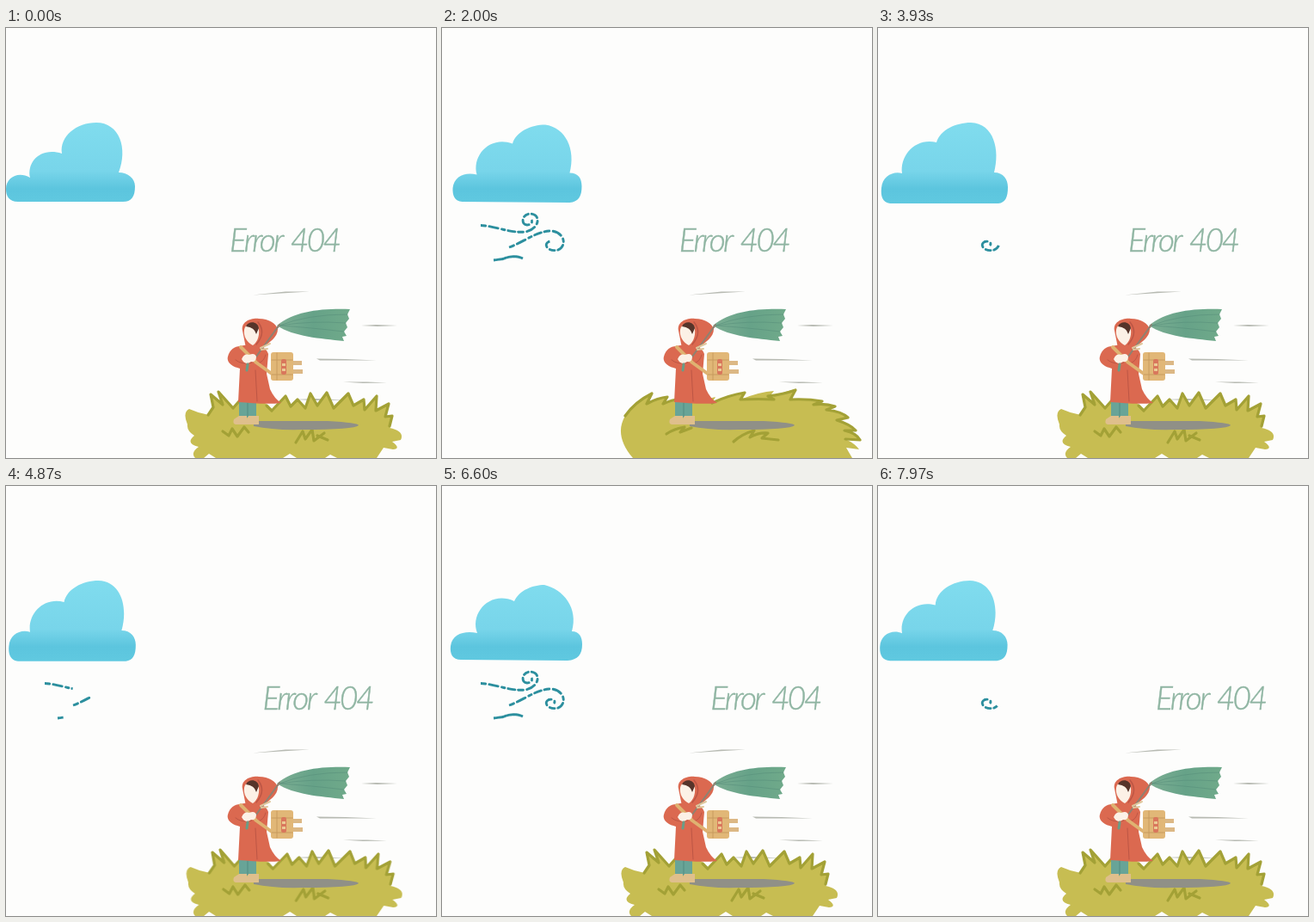
Write an HTML page that moves like this. It is 500x500 px and loops after 8.01 s.

```html
<!DOCTYPE html>
<html lang="en">
<head>
<meta charset="utf-8">
<title>Error 404</title>
<style>
  html, body { margin: 0; width: 100%; height: 100%; overflow: hidden; background: #fdfdfc; }
  svg { display: block; width: 100vw; height: 100vh; }
  .line { fill: none; stroke-linecap: round; stroke-linejoin: round; }

  .title {
    font: italic 300 37px Lato, "Open Sans", sans-serif;
    letter-spacing: -2.6px;
    word-spacing: 4px;
    fill: #8fb5a2;
    stroke: #8fb5a2;
    stroke-width: .5;
    animation: drift 8010ms linear infinite;
  }
  @keyframes drift { to { transform: translateX(63.3px); } }

  .cloud { animation: puff 4005ms linear infinite; }
  @keyframes puff {
    0%, 100% { d: path("M14 202C3 202 0 195 0 187C0 174 14 166 28 174C24 156 40 138 65 146C62 126 82 110 105 110C132 110 142 140 131 168C142 168 150 175 150 184C150 196 146 202 136 202Z"); }
    25.6%, 86.5%, 98.3% { d: path("M14 204C5 203 3 195 4 186C5 172 18 166 28 169C25 148 44 127 68 133C72 119 90 110 108 110C135 111 142 142 135 168C146 168 151 176 151 185C151 197 148 203 140 204Z"); }
    33.2%, 80% { d: path("M22 203C14 202 12 194 12 186C13 172 26 166 36 170C33 149 50 128 77 134C79 120 98 110 118 110C145 111 152 140 145 168C155 168 159 175 159 184C159 196 156 203 148 204Z"); }
    43.1% { d: path("M25 202C17 201 15 194 15 186C16 172 29 166 40 170C37 149 55 129 80 135C82 120 101 110 121 110C146 111 153 140 146 168C158 168 162 175 162 184C162 196 159 202 151 203Z"); }
    57%, 72% { d: path("M22 202C12 202 9 195 10 186C12 172 26 168 41 171C32 148 56 121 84 134C90 121 106 115 119 115C141 120 159 142 151 169C160 169 163 176 163 184C163 196 158 202 146 203Z"); }
  }

  .ink { stroke: #2c8f9e; stroke-width: 2.9; stroke-dasharray: 5 3.6 9 3.8 3 3.4 7 3.2; }
  .reveal { stroke: #fff; stroke-width: 7; stroke-linecap: butt; stroke-dasharray: 100 300; animation: 4005ms linear infinite; }
  .r1 { animation-name: gust1; }
  .r2 { animation-name: gust2; }
  .r3 { animation-name: gust3; }
  @keyframes gust1 {
    0%, 12% { stroke-dashoffset: 101; }
    45%, 70% { stroke-dashoffset: 0; }
    94%, 100% { stroke-dashoffset: -101; }
  }
  @keyframes gust2 {
    0%, 14% { stroke-dashoffset: 101; }
    53%, 70% { stroke-dashoffset: 0; }
    98.1% { stroke-dashoffset: -66; }
    100% { stroke-dashoffset: -72; }
  }
  @keyframes gust3 {
    0%, 15% { stroke-dashoffset: 101; }
    48%, 70% { stroke-dashoffset: 0; }
    92%, 100% { stroke-dashoffset: -101; }
  }

  .turf { fill: #c7bd52; }
  .blade { stroke: #a3a136; stroke-width: 3.2; }
  .upright { transform-origin: 330px 500px; animation: upright 4005ms step-end infinite; }
  .blown { animation: blown 4005ms step-end infinite; }
  @keyframes upright {
    0% { opacity: 1; transform: none; }
    12.5% { opacity: 1; transform: skewX(-1.5deg); }
    26% { opacity: 0; transform: none; }
    54% { opacity: 1; transform: none; }
    75% { opacity: 1; transform: skewX(-1.5deg); }
    87.5% { opacity: 1; transform: none; }
  }
  @keyframes blown {
    0% { opacity: 0; }
    26% { opacity: 1; }
    54%, 100% { opacity: 0; }
  }
</style>
</head>
<body>
<svg viewBox="0 0 500 500">
  <defs>
    <linearGradient id="sky" gradientUnits="userSpaceOnUse" x1="0" y1="110" x2="0" y2="204">
      <stop offset="0" stop-color="#80dcee"/>
      <stop offset=".6" stop-color="#78d5ea"/>
      <stop offset=".82" stop-color="#5cc5de"/>
      <stop offset="1" stop-color="#60c9e0"/>
    </linearGradient>
    <linearGradient id="canopy" x1="0" y1="0" x2="1" y2="0">
      <stop offset="0" stop-color="#7cae93"/>
      <stop offset=".5" stop-color="#66a288"/>
      <stop offset="1" stop-color="#70aa8a"/>
    </linearGradient>
    <path id="w1" pathLength="100" d="M45 229.500C61 230 80 239 97 237C113 234 116 217 103 216C93 216 91 228 99 229C103 229 106 226 104 223"/>
    <path id="w2" pathLength="100" d="M78 255C95 249 110 236 127 236C142 237 146 253 135 258C124 261 117 252 124 248.500C129 247 133 250 130 253"/>
    <path id="w3" pathLength="100" d="M60 270L71 268.500C77 266 86 264 94 268"/>
    <mask id="gusts" maskUnits="userSpaceOnUse" x="30" y="205" width="130" height="75">
      <g class="line">
        <use href="#w1" class="reveal r1"/>
        <use href="#w2" class="reveal r2"/>
        <use href="#w3" class="reveal r3"/>
      </g>
    </mask>
  </defs>

  <path class="cloud" fill="url(#sky)" d=""/>

  <g mask="url(#gusts)">
    <g class="line ink">
      <use href="#w1"/><use href="#w2"/><use href="#w3"/>
    </g>
  </g>

  <text class="title" x="260" y="260">Error 404</text>

  <!-- streaks of wind -->
  <g fill="#b7bab2">
    <path d="M287 310.500L325 306.500L353 306.500L320 308.500Z"/>
    <path d="M413 346L430 345L455 346L432 347Z"/>
    <path d="M361 384.500L395 385L431 386.500L365 386.500Z"/>
    <path d="M392 411.500L420 411.500L443 412.500L415 413Z"/>
    <path d="M336 432L360 431L395 432.500L360 433Z"/>
  </g>

  <g class="upright">
    <path class="turf" d="M220 500Q214 494 224 487Q208 483 219 474Q210 468 211 461Q205 447 213 443Q224 448 236 450L241 441L238 426L252 438L247 423L264 442L271 434L279 443L297 431L309 445L325 428L331 440L339 432L348 442L354 425L362 439L373 424L381 442L398 425L404 439L416 432L417 444L431 428L430 445L445 437L441 452L449 451L446 465Q464 469 459 479L449 481Q460 489 450 490L439 488L431 500H385L377 496L371 500H338L330 495L322 500H244L236 495L230 500Z"/>
    <path class="line blade" d="M235 450L241 441L238 426L252 438L247 423L264 442L271 434L279 443M303 439L309 445L325 428L331 440L339 432L348 442L354 425L362 439L373 424L381 442L398 425L404 439L416 432L417 444L431 428L430 445L445 437L441 452L449 451L446 463"/>
    <path class="line blade" d="M252 469L259 474L263 466L269 475L277 464L282 470M337 482L345 469L348 478L356 467L358 480L370 471M362 474L374 479"/>
  </g>

  <g class="blown">
    <path class="turf" d="M222 500C207 483 204 466 213 451Q224 435 244 425L238 437Q251 430 262 429L257 437Q274 430 291 431L285 437L318 429L314 436Q333 427 352 423L347 432Q369 423 386 422L379 431Q397 423 411 420L405 432Q425 431 442 434L432 438Q445 436 457 440L447 444Q465 446 472 453L459 456Q475 461 481 468L468 468Q482 471 487 479L469 478Q480 483 485 490L470 488L477 500Z"/>
    <path class="line blade" d="M213 451Q224 435 244 425L238 437Q251 430 262 429L257 437Q268 432 275 432M314 436Q333 427 352 424L347 432Q369 431 386 432L379 428Q397 426 411 421L405 432Q425 431 442 434L432 438Q445 436 457 440L447 444Q465 446 472 453L459 456Q475 461 481 468L468 468Q482 471 486 479L469 478"/>
    <path class="line blade" d="M261 472Q270 466 282 464L277 470L290 465M339 481Q349 472 363 468L358 476Q368 470 379 471L372 477L391 479"/>
  </g>

  <path fill="#909087" d="M288 457L374 457Q410 459 410 462Q405 467 345 467Q312 468 288 463Z"/>

  <!-- umbrella -->
  <path class="line" stroke="#8d8272" stroke-width="2" d="M283 393L318 345"/>
  <path fill="url(#canopy)" d="M315 346C336 329 366 326 400 327L397 333L399 338L395 343L397 348L393 353L396 358L391 359L393 364C365 361 335 359 315 346Z"/>
  <g class="line" stroke="#578f7a" stroke-width=".8" opacity=".7">
    <path d="M318 346Q350 333 397 333M318 346Q355 340 395 343M318 346Q350 348 393 353"/>
  </g>

  <!-- legs and boots -->
  <path fill="#68a497" d="M271 432H291V453H271Z"/>
  <path class="line" stroke="#538b80" stroke-width="1" d="M281 436V452"/>
  <path fill="#dfbf8c" d="M271 451H280V461H267Q263 460 265 455ZM282 451H294V461H279Q279 455 282 451Z"/>

  <!-- coat -->
  <path fill="#db6950" d="M272 370C288 366 302 369 305 379L303 402L307 420Q312 431 320 436C304 438 286 436 270 435L272 396C263 394 256 389 258 382C260 374 266 370 272 370Z"/>
  <path class="line" stroke="#bd5645" stroke-width="1" d="M267 386Q274 392 286 389M293 390Q300 388 302 380M290 398L292 434"/>

  <!-- hood, face and hair -->
  <path fill="#db6950" d="M275 352C273 342 284 337 294 338C306 338 314 344 316 350C316 360 306 365 299 372L279 372Z"/>
  <path class="line" stroke="#bd5645" stroke-width="1.500" d="M293 342Q303 354 291 368"/>
  <path fill="#fcf1e6" d="M277 351C278 343 288 342 293 347C296 355 293 365 287 369C280 365 276 359 277 351Z"/>
  <path fill="#56342a" d="M279 347C282 340 293 341 294 349L291 356Q289 348 279 347Z"/>
  <path class="line" stroke="#8d8272" stroke-width="2" d="M291 382L318 345"/>
  <path class="line" stroke="#dfc79c" stroke-width="2" d="M296 372L307 367M297 374L304 373"/>

  <!-- satchel -->
  <path class="line" stroke="#dfb271" stroke-width="4" d="M273 371L291 389L309 402"/>
  <path fill="#dcb885" d="M331 387H344V392H331ZM331 397H345V402H331Z"/>
  <rect x="308" y="377" width="26" height="33" rx="3" fill="#e1b777"/>
  <path class="line" stroke="#c79a5f" stroke-width="1" d="M309 386H333M315 378V409M309 403H333"/>
  <rect x="320" y="385" width="6" height="18" rx="2" fill="#d9775c"/>
  <path fill="#ecca94" d="M321 390H325V393H321ZM321 396H325V399H321Z"/>

  <!-- hands and handle -->
  <path fill="#fcf1e6" d="M274 385Q277 378 283 380Q289 377 291 382Q291 389 285 388Q278 393 274 385Z"/>
  <path class="line" stroke="#6b9c86" stroke-width="3" d="M281 391L280 398"/>
</svg>
</body>
</html>
```
